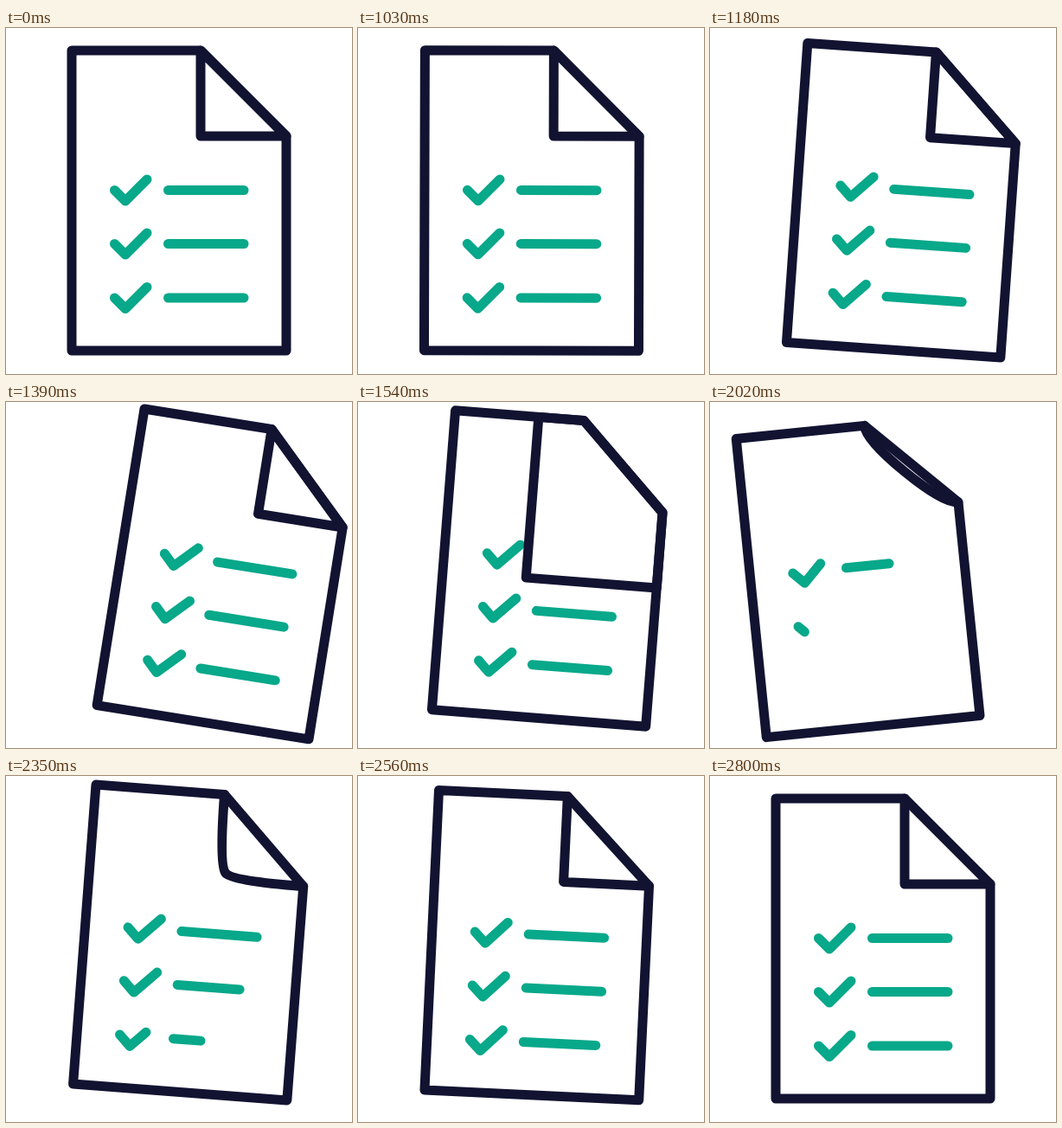
Recreate the animation shown at these times as an HTML page with a canvas. Size 400 by 400 pixels, loop 2.83 s.

```html
<!DOCTYPE html>
<html lang="en">
<head>
<meta charset="utf-8">
<title>Checklist page</title>
<style>
  html, body { margin: 0; width: 100%; height: 100%; overflow: hidden; background: #fff; }
  canvas { display: block; width: 100vw; height: 100vh; object-fit: contain; }
</style>
</head>
<body>
<canvas width="400" height="400"></canvas>
<script>
const ctx = document.querySelector('canvas').getContext('2d');
const INK = '#121331', GREEN = '#08a88a';
const LOOP = 2830, HOLD = 1000, STEP = 30;

// Page edges and the fold corner at rest
const L = 76, T = 26, R = 324, B = 373, FX = 225, FY = 125;
const CX = 200, CY = 199.5;

// Keys are [step, value], eased in and out between neighbours
const ANGLE = [[0, 0], [13, 9.1], [27.5, -7.7], [30, -7.7], [46, 4.5], [60, 0]];
const SHIFT_X = [[0, 0], [13, 55], [25.5, -37], [30, -37], [46, 15], [60, 0]];
const SHIFT_Y = [[0, 0], [13, -0.6], [18, -7], [28, 2], [31, 3], [35, 3], [45, -7], [60, 0]];
const PEEL = [13, 25.5], CURL = [28, 51];

const ROWS = [
  { y: 187.5, check: 25, line: 25.8 },
  { y: 249.5, check: 30.9, line: 34 },
  { y: 312, check: 36.8, line: 38.9 },
];
const CHECK_TIME = 11.5, LINE_TIME = 15;

const mix = (a, b, p) => a + (b - a) * p;

function ease(n, from, to) {
  const p = Math.min(1, Math.max(0, (n - from) / (to - from)));
  return p * p * (3 - 2 * p);
}

function track(keys, n) {
  const i = Math.max(1, keys.findIndex(k => k[0] >= n));
  const [a, b] = [keys[i - 1], keys[i]];
  return mix(a[1], b[1], ease(n, a[0], b[0]));
}

function poly(points, close) {
  ctx.beginPath();
  points.forEach(([x, y]) => ctx.lineTo(x, y));
  if (close) ctx.closePath();
}

// Strokes the first part p of a path
function trim(points, p) {
  if (p <= 0) return;
  let length = 0;
  for (let i = 1; i < points.length; i++) {
    length += Math.hypot(points[i][0] - points[i - 1][0], points[i][1] - points[i - 1][1]);
  }
  ctx.setLineDash(p < 1 ? [length * p, 999] : []);
  poly(points);
  ctx.stroke();
  ctx.setLineDash([]);
}

function drawRows(n) {
  ctx.strokeStyle = GREEN;
  for (const { y, check, line } of ROWS) {
    const old = n < PEEL[1];
    trim([[125.5, y], [138, y + 12.5], [163, y - 12.5]], old ? 1 : ease(n, check, check + CHECK_TIME));
    trim([[187.5, y], [275, y]], old ? 1 : ease(n, line, line + LINE_TIME));
  }
}

// The folded corner swept across the sheet
function drawPeel(n) {
  const p = ease(n, ...PEEL), x = mix(FX, L, p), y = mix(FY, B, p);
  poly([[x, T], [x, y], [R, y], [R, FY], [FX, T]], true);
  ctx.fill();
  ctx.stroke();
}

// A new corner bending in from the diagonal edge
function drawCurl(n) {
  const s = ease(n, ...CURL), r = 36 * (1 - s), h = 60 * s;
  const x = mix((FX + R) / 2, FX, s), y = mix((T + FY) / 2, FY, s);
  ctx.beginPath();
  ctx.moveTo(FX, T);
  ctx.bezierCurveTo(FX, T + h, x - r, y - r, x, y);
  ctx.bezierCurveTo(x + r, y + r, R - h, FY, R, FY);
  ctx.stroke();
}

function draw(n) {
  ctx.setTransform(1, 0, 0, 1, 0, 0);
  ctx.fillStyle = '#fff';
  ctx.fillRect(0, 0, 400, 400);
  ctx.translate(CX + track(SHIFT_X, n), CY + track(SHIFT_Y, n));
  ctx.rotate(track(ANGLE, n) * Math.PI / 180);
  ctx.translate(-CX, -CY);
  ctx.lineWidth = 11;
  ctx.lineCap = ctx.lineJoin = 'round';

  drawRows(n);
  ctx.strokeStyle = INK;
  if (n < PEEL[1]) drawPeel(n);
  else drawCurl(n);
  poly([[L, T], [FX, T], [R, FY], [R, B], [L, B]], true);
  ctx.stroke();
}

function tick() {
  const t = performance.now() % LOOP;
  draw(Math.max(0, Math.floor((t - HOLD) / STEP)));
  requestAnimationFrame(tick);
}
tick();
</script>
</body>
</html>
```
